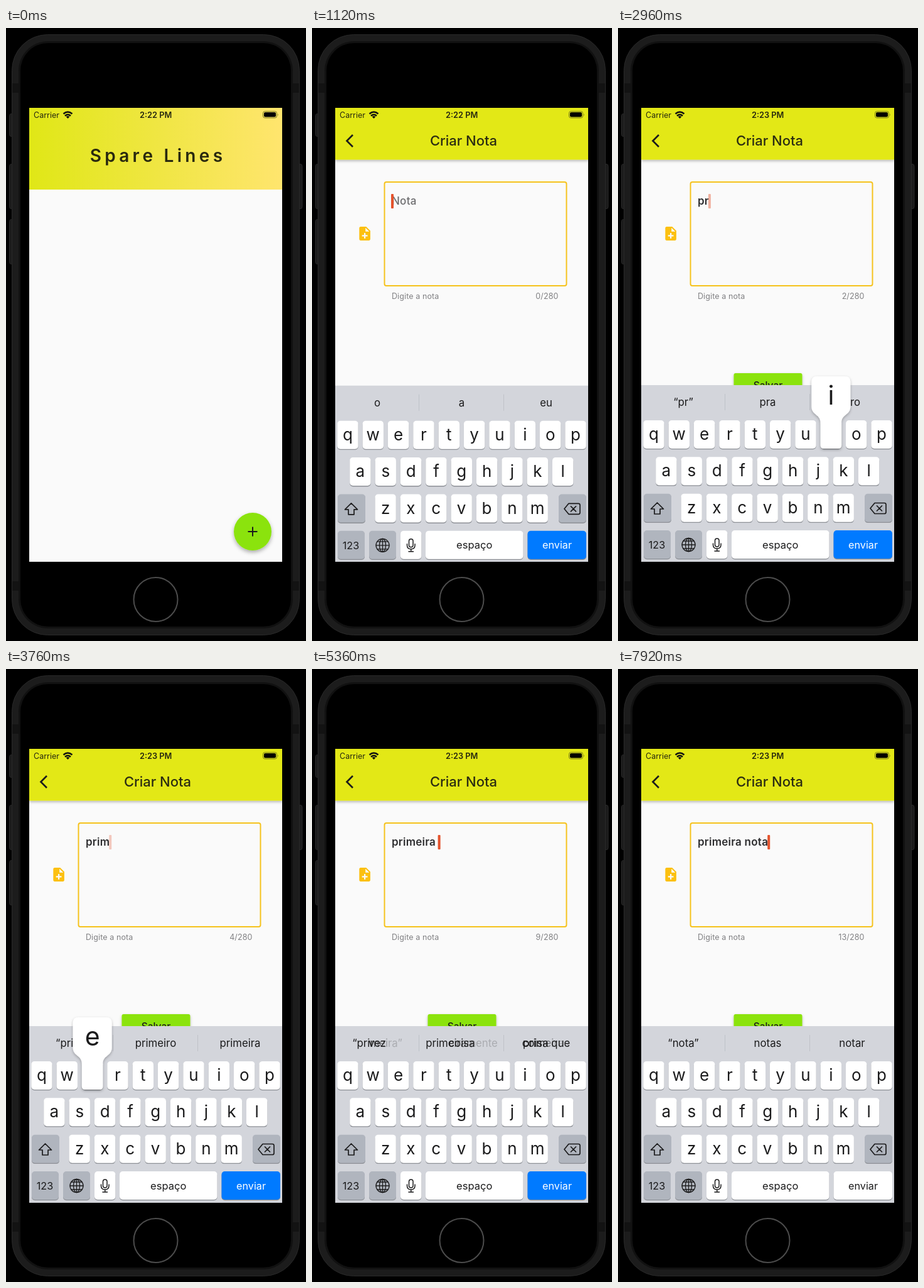
An HTML page for the animation above (8 s loop, 478x975 px).

```html
<!DOCTYPE html>
<html lang="pt">
<head>
<meta charset="utf-8">
<title>Notes demo</title>
<style>
html, body { margin: 0; width: 100%; height: 100%; overflow: hidden; background: #000; }
svg { display: block; }
text { font-family: Inter, Roboto, sans-serif; white-space: pre; fill: #1b1b1c; }
.mid { text-anchor: middle; }
.line { fill: none; stroke: #1b1b1c; stroke-width: 1.7; stroke-linecap: round; stroke-linejoin: round; }
#typed, #hint { font-size: 17px; font-weight: 600; letter-spacing: .25px; fill: #2c2c2e; }
#hint { fill: #6d6d6f; font-weight: 500; }
.small { font-size: 12.5px; letter-spacing: .1px; fill: #808083; }
.letter { font-size: 26px; }
.word { font-size: 16.8px; }
</style>
</head>
<body>
<svg width="478" height="975" viewBox="0 0 478 975">
  <defs>
    <linearGradient id="sun"><stop offset="0" stop-color="#e0e716"/><stop offset="1" stop-color="#ffe56e"/></linearGradient>
    <linearGradient id="wipe"><stop offset=".3" stop-color="#1b1b1c"/><stop offset=".55" stop-color="#1b1b1c" stop-opacity=".55"/><stop offset=".75" stop-color="#1b1b1c" stop-opacity=".22"/></linearGradient>
    <clipPath id="screen"><path d="M37 127H440V849H37Z"/></clipPath>
    <filter id="soft" x="-30%" y="-30%" width="160%" height="180%"><feDropShadow dx="0" dy="3" stdDeviation="3" flood-opacity=".32"/></filter>
    <filter id="bar" x="-5%" y="-5%" width="110%" height="125%"><feDropShadow dx="0" dy="2" stdDeviation="2" flood-opacity=".28"/></filter>
  </defs>

  <g id="phone">
    <g fill="#1b1b1b" stroke="#292929">
      <rect x="5.5" y="136.500" width="9" height="36" rx="3"/>
      <rect x="5.5" y="216.500" width="9" height="71" rx="3"/>
      <rect x="5.5" y="304.500" width="9" height="71" rx="3"/>
      <rect x="463" y="216.500" width="9" height="71" rx="3"/>
      <rect x="9.500" y="10.500" width="458" height="955" rx="57" fill="#1c1c1c"/>
    </g>
    <rect x="20" y="21" width="437" height="934" rx="47" fill="#111"/>
    <rect x="23" y="24" width="431" height="928" rx="44"/>
    <path d="M10 88h10v15H10zM457 88h10v15h-10zM10 880h10v15H10zM457 880h10v15h-10z" fill="#131313"/>
    <circle cx="238.500" cy="909" r="35" stroke="#4c4c4c" stroke-width="2"/>
  </g>

  <g clip-path="url(#screen)">
    <g id="home">
      <path d="M37 127H440V849H37Z" fill="#fafafa"/>
      <path d="M37 127H440V257H37Z" fill="url(#sun)"/>
      <text class="mid" x="242" y="213" font-size="28" font-weight="600" letter-spacing="5.3" style="fill:#29290f">Spare Lines</text>
      <circle cx="393" cy="801" r="30" fill="#8be30c" filter="url(#soft)"/>
      <path d="M385.500 801h15M393 793.500v15" class="line" style="stroke-width:2;stroke-linecap:butt"/>
    </g>

    <g id="editor">
      <path d="M37 127H440V849H37Z" fill="#fafafa"/>
      <path d="M37 127H440V209.500H37Z" fill="#e3e819" filter="url(#bar)"/>
      <path d="M65 170L55.500 179.500L65 189" class="line" style="stroke-width:2.700;stroke-linecap:butt;stroke-linejoin:miter"/>
      <text class="mid" x="241.500" y="187" font-size="22" font-weight="500" style="fill:#2b2c12">Criar Nota</text>
      <rect x="115.500" y="245" width="290" height="165" rx="3" fill="none" stroke="#f6c21c" stroke-width="2"/>
      <path transform="translate(70.900 313.800) scale(1.1)" fill="#fcc010" d="M14 2H6c-1.100 0-2 .9-2 2v16c0 1.100.9 2 2 2h12c1.100 0 2-.9 2-2V8zm2 14h-3v3h-2v-3H8v-2h3v-3h2v3h3zm-3-7V3.500L18.500 9z"/>
      <path id="mark" d="M127 264h10v22h-10z" fill="#f3e3a3"/>
      <text id="hint" x="127" y="281">Nota</text>
      <text id="typed" x="127" y="281"></text>
      <rect id="caret" y="264" width="4" height="23" rx="1" fill="#e4532d"/>
      <text class="small" x="127" y="431">Digite a nota</text>
      <text class="small" id="count" x="392.500" y="431" text-anchor="end"></text>
      <g id="save">
        <rect x="184.500" y="549" width="109" height="40" rx="3" fill="#8be30c" filter="url(#bar)"/>
        <text class="mid" x="239" y="573.500" font-size="15.500" font-weight="500">Salvar</text>
      </g>
    </g>

    <g id="status">
      <text x="44" y="143" font-size="12.500" style="fill:#26270f">Carrier</text>
      <g fill="none" stroke="#111" stroke-width="2.500"><path d="M91.500 136.500Q98.500 130.500 105.500 136.500M94 139.700Q98.500 135.700 103 139.700"/><path d="M98.500 144L95.800 141.200Q98.500 139 101.200 141.200Z" fill="#111" stroke="none"/></g>
      <text id="clock" class="mid" x="238.700" y="143" font-size="12.800" font-weight="600" style="fill:#26270f"></text>
      <rect x="409.500" y="132.500" width="22" height="10.500" rx="3" fill="none" stroke="#77791a"/>
      <rect x="411" y="134" width="19" height="7.500" rx="2"/>
      <path d="M433 136v4q1.500-2 0-4" fill="#77791a"/>
    </g>

    <g id="keyboard"></g>
  </g>
</svg>
<script>
const LOOP = 8000;
const $ = id => document.getElementById(id);
const STEP = 40.35, KEY_W = 33.4;
const MIDS = [104, 238.5, 373];

// character, finger down, finger up (ms)
const PRESSES = [
  ["p", 1840, 1960], ["r", 2480, 2600], ["i", 2880, 3000], ["m", 3280, 3370],
  ["e", 3740, 3860], ["i", 4160, 4260], ["r", 4480, 4580], ["a", 4800, 4900],
  [" ", 5130, 5240], ["n", 5700, 5800], ["o", 6150, 6260], ["t", 6640, 6750],
  ["a", 7040, 7150]
];
const SUGGEST = [
  "o|a|eu", "“p”|o|porque", "“pr”|pra|pro", "“pri”|primeiro|primeira",
  "“prim”|primeiro|primeira", "“prime”|primeiro|primeira",
  "“primei”|primeiro|primeira", "“primeir”|primeiro|primeira",
  "“primeira”|primeiramente|primeiras", "vez|coisa|coisa que",
  "“n”|não|no", "“no”|no|nos", "“not”|nota|notícia", "“nota”|notas|notar"
].map(s => s.split("|"));
const FOCUS = 1000, SPACE_COUNT = 9, SWAP = 200, SEND_DOWN = 7900, MINUTE = 2700;

const keys = {};

function keyRect(x, y, w, fill, id = "") {
  return `<rect x="${x}" y="${y + 1.3}" width="${w}" height="45" rx="5" fill="#8d9096"/>
    <rect ${id && `id="${id}"`} x="${x}" y="${y}" width="${w}" height="45" rx="5" fill="${fill}"/>`;
}

function letterRow(chars, x, y) {
  return [...chars].map((ch, i) => {
    const left = x + i * STEP, mid = left + KEY_W / 2;
    keys[ch] = { mid, y };
    return keyRect(left, y, KEY_W, "#fff") + `<text class="mid letter" x="${mid}" y="${y + 31}">${ch}</text>`;
  }).join("");
}

function buildKeyboard() {
  const grey = "#b0b5be";
  const words = MIDS.map((x, i) =>
    `<text class="mid word" id="old${i}" x="${x}" y="601" style="fill:url(#wipe)"></text>
     <text class="mid word" id="word${i}" x="${x}" y="601"></text>`).join("");
  $("keyboard").innerHTML = `
    <path d="M37 568H440V849H37Z" fill="#d3d5db"/>
    <path id="bars" d="M170.500 582v26M305.500 582v26" stroke="#bfc2c8"/>
    <rect id="pick" x="171" y="574" width="135" height="41" rx="5" fill="#eaebed"/>${words}
    ${letterRow("qwertyuiop", 40.2, 624)}${letterRow("asdfghjkl", 60.2, 682.3)}${letterRow("zxcvbnm", 100.4, 740.8)}
    ${keyRect(41, 740.8, 44, grey)}${keyRect(393, 740.8, 44, grey)}
    ${keyRect(41, 799, 43, grey)}${keyRect(91, 799, 43, grey)}${keyRect(141, 799, 33.4, "#fff")}
    ${keyRect(181, 799, 155.5, "#fff", "space")}${keyRect(343.500, 799, 93.500, "#007aff", "send")}
    <path class="line" d="M62.500 755L52.500 765H58V773H67V765H72.500Z"/>
    <path class="line" d="M409 755.500H424.500Q427 755.500 427 758V770Q427 772.500 424.500 772.500H409L402 764ZM412.500 760l8 8M420.500 760l-8 8"/>
    <g class="line" style="stroke-width:1.300"><circle cx="112.500" cy="822" r="10.500"/><ellipse cx="112.500" cy="822" rx="5" ry="10.500"/>
      <path d="M112.500 811.500v21M102 822h21M104 816h17M104 828h17"/></g>
    <g class="line" style="stroke-width:1.500"><rect x="154.500" y="812" width="6.500" height="13" rx="3.250"/>
      <path d="M151.500 820v2q0 6 6.250 6t6.250-6v-2M157.750 828v4M154 832h7.500"/></g>
    <text class="mid" x="62" y="828" font-size="16.200">123</text>
    <text class="mid" x="258.700" y="827.500" font-size="16.500">espaço</text>
    <text class="mid" id="sendText" x="390.500" y="827.500" font-size="16.200">enviar</text>
    <g id="popup"><path id="bubble" fill="#fff" filter="url(#bar)"/><text class="mid" id="big" font-size="41"></text></g>`;
}

function bubblePath({ mid, y }) {
  const l = mid - KEY_W / 2, r = mid + KEY_W / 2;
  const L = Math.max(mid - 31, 39), R = Math.min(mid + 31, 438), top = y - 70;
  return `M${L} ${top + 9}Q${L} ${top} ${L + 9} ${top}H${R - 9}Q${R} ${top} ${R} ${top + 9}V${y - 22}
    C${R} ${y - 8} ${r} ${y - 10} ${r} ${y + 4}V${y + 40}q0 5-5 5H${l + 5}q-5 0-5-5V${y + 4}
    C${l} ${y - 10} ${L} ${y - 8} ${L} ${y - 22}Z`;
}

const clamp = v => Math.min(1, Math.max(0, v));
const easeOut = (t, start, span) => 1 - (1 - clamp((t - start) / span)) ** 3;
const show = (id, on) => $(id).setAttribute("display", on ? "inline" : "none");
const shift = (id, x, y) => $(id).setAttribute("transform", `translate(${x} ${y})`);

function caretAlpha(age) {
  const a = age % 1000;
  return a < 500 ? 1 - clamp((a - 250) / 200) : clamp((a - 550) / 200);
}

function render(t) {
  const slide = easeOut(t, 690, 390);
  shift("home", -134 * slide, 0);
  shift("editor", 403 * (1 - slide), 0);
  shift("keyboard", 0, 281 * (1 - easeOut(t, 760, 420)));
  show("home", slide < 1);
  show("editor", slide > 0);

  const done = PRESSES.filter(p => t >= p[2]);
  const n = done.length;
  const last = n ? done[n - 1][2] : FOCUS;
  $("typed").textContent = done.map(p => p[0]).join("");
  $("count").textContent = n + "/280";
  $("clock").textContent = t < MINUTE ? "2:22 PM" : "2:23 PM";
  show("hint", !n);
  show("save", n);
  show("mark", n === 1);
  show("pick", n === 1);
  show("bars", n !== 1);

  const width = n ? $("typed").getComputedTextLength() : 0;
  $("caret").setAttribute("x", 126 + width);
  $("caret").setAttribute("opacity", t < FOCUS ? 1 : caretAlpha(t - last));

  const swapping = n === SPACE_COUNT && t - last < SWAP;
  SUGGEST[n].forEach((word, i) => {
    $("word" + i).textContent = word;
    $("old" + i).textContent = swapping ? SUGGEST[n - 1][i] : "";
  });

  const held = PRESSES.find(p => t >= p[1] && t < p[2]);
  const key = held && keys[held[0]];
  show("popup", key);
  if (key) {
    $("bubble").setAttribute("d", bubblePath(key));
    $("big").textContent = held[0];
    $("big").setAttribute("x", Math.min(key.mid, 410));
    $("big").setAttribute("y", key.y - 25);
  }
  $("space").setAttribute("fill", held && held[0] === " " ? "#b0b5be" : "#fff");
  const sent = t >= SEND_DOWN;
  $("send").setAttribute("fill", sent ? "#fff" : "#007aff");
  $("sendText").style.fill = sent ? "#1b1b1c" : "#fff";
}

buildKeyboard();
const start = performance.now();
function tick() {
  render((performance.now() - start) % LOOP);
  requestAnimationFrame(tick);
}
tick();
</script>
</body>
</html>
```
